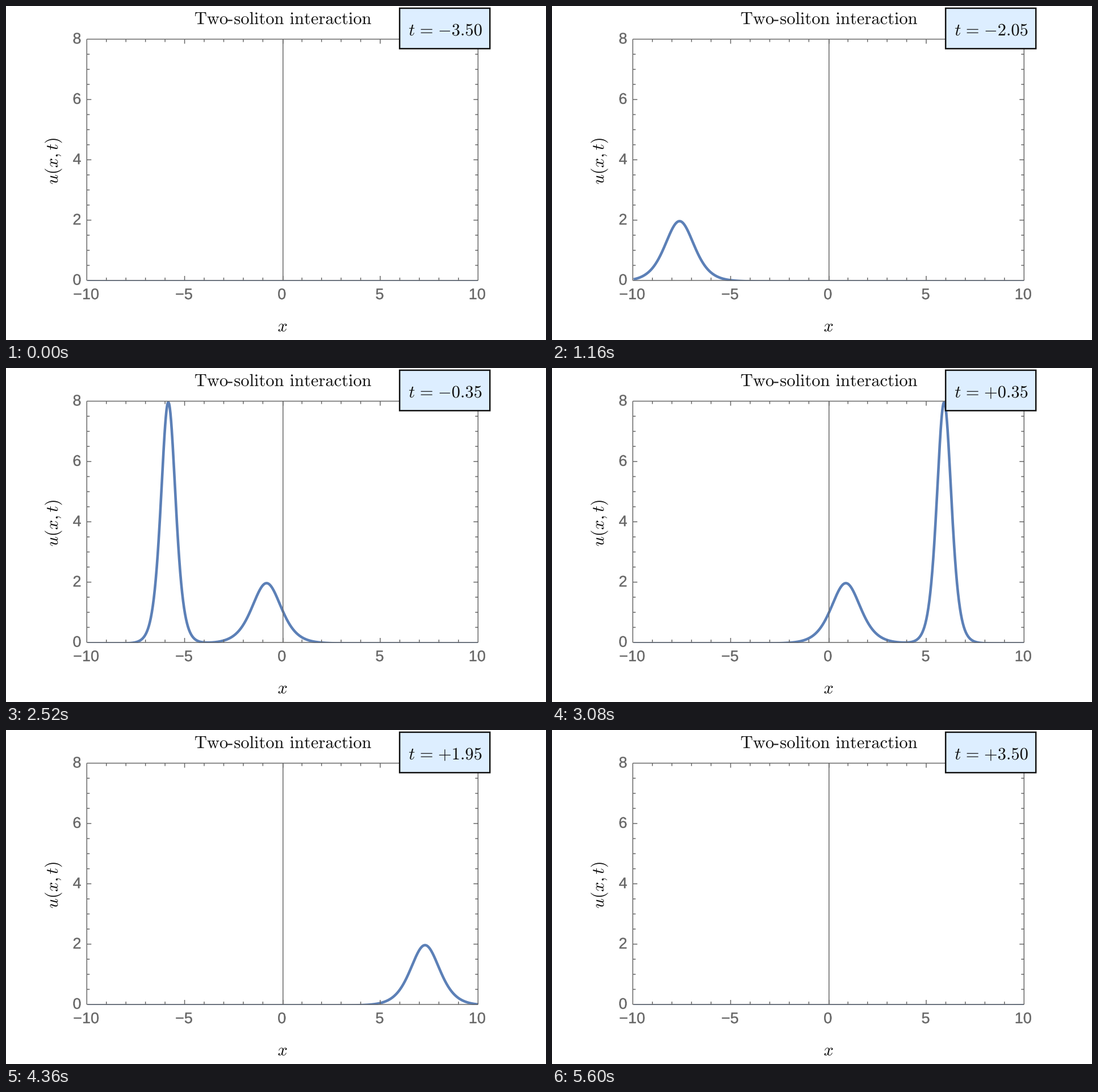
A matplotlib script for the animation above (5.64 s loop, 951 by 589 pixels).

```python
import numpy as np
import matplotlib.pyplot as plt
from matplotlib.animation import FuncAnimation
from matplotlib.collections import LineCollection
from matplotlib.patches import PathPatch, Rectangle
from matplotlib.textpath import TextPath
from matplotlib.transforms import Affine2D

W, H, DPI = 951, 589, 64
FRAMES, STEP_MS = 141, 40
EM = 30.5
INK, GRAY, BLUE = "#111111", "#666666", "#5c80b7"
LEFT, RIGHT, TOP, BOTTOM = 142.3, 831.3, 58.5, 484.0
SHIFT = 1.4, 1.8  # the curve sits slightly right of and below the frame's grid
SANS = {"family": "Liberation Sans"}

plt.rcParams["mathtext.fontset"] = "cm"


def px(w):
    return w * 72 / DPI


def sx(x):
    return LEFT + (x + 10) / 20 * (RIGHT - LEFT)


def sy(u):
    return BOTTOM - u / 8 * (BOTTOM - TOP)


fig = plt.figure(figsize=(W / DPI, H / DPI), dpi=DPI, facecolor="white")
ax = fig.add_axes([0, 0, 1, 1])
ax.set_xlim(0, W)
ax.set_ylim(H, 0)
ax.axis("off")


def glyphs(s, x, y, size=EM, align=0.5, turn=0, font=None):
    """Outline of a text, its ink aligned to x and its baseline at y."""
    path = TextPath((0, 0), s, size=size, prop=font)
    box = path.get_extents()
    shift = -(box.x0 + align * box.width)
    place = Affine2D().translate(shift, 0).scale(1, -1).rotate_deg(-turn)
    return place.translate(x, y).transform_path(path)


def write(s, x, y, **kw):
    return ax.add_patch(PathPatch(glyphs(s, x, y, **kw), fc=INK, lw=0,
                                  zorder=5, snap=False))


def tick_label(k, x, y):
    path = glyphs(str(k).replace("-", "\u2212"), x, y, size=27, font=SANS)
    ax.add_patch(PathPatch(path, fc=GRAY, ec=GRAY, lw=px(0.4), snap=False))


def soliton(x, t):
    top = 3 + 4 * np.cosh(2 * x - 8 * t) + np.cosh(4 * x - 64 * t)
    return 12 * top / (3 * np.cosh(x - 28 * t) + np.cosh(3 * x - 36 * t)) ** 2


def clock(t):
    sign = "-" if t < 0 else "+"
    s = rf"$t\hspace{{0.117}}=\hspace{{0.117}}{{{sign}}}{abs(t):.2f}$"
    return glyphs(s, 710, 52, align=0)


# Frame, ticks and the vertical axis
axis = sx(0) + SHIFT[0] - 0.4
lines = [[(LEFT, TOP), (RIGHT, TOP)], [(LEFT, BOTTOM), (RIGHT, BOTTOM)],
         [(LEFT, TOP), (LEFT, BOTTOM)], [(RIGHT, TOP), (RIGHT, BOTTOM)],
         [(axis, TOP), (axis, BOTTOM)]]
for k in range(-9, 10):
    n = 5 if k % 5 else 8
    x = sx(k) if k else axis
    lines += [[(x, TOP), (x, TOP + n)], [(x, BOTTOM), (x, BOTTOM - n)]]
for k in range(1, 16):
    n = 5 if k % 4 else 8
    y = sy(k / 2)
    lines += [[(LEFT, y), (LEFT + n, y)], [(RIGHT, y), (RIGHT - n, y)]]
frame = LineCollection(lines, colors=GRAY, linewidths=px(1.5), zorder=4)
frame.set_snap(False)
ax.add_collection(frame)

for k in range(-10, 11, 5):
    tick_label(k, sx(k) - 1, 517)
for k in range(0, 9, 2):
    tick_label(k, 125, sy(k) + 7.7)

# Title and axis labels
write(r"$\mathrm{Two}\hspace{0.379}\mathrm{soliton}\hspace{0.379}\mathrm{interaction}$",
      488, 32)
ax.add_patch(Rectangle((390.4, 24.4), 8.3, 2, fc=INK, lw=0, snap=False))
write("$x$", 487, 574)
write("$u(x,t)$", 91, 274, turn=90)

# Time box
ax.add_patch(Rectangle((693.2, 3.9), 159, 71.3, fc="#ddeeff", ec=INK,
                       lw=px(2.5), zorder=6, snap=False))
counter = ax.add_patch(PathPatch(clock(-3.5), fc=INK, lw=0, zorder=7, snap=False))

xs = np.linspace(-10, 10, 1201)
curve, = ax.plot([], [], color=BLUE, lw=px(4.6), solid_joinstyle="round",
                 solid_capstyle="butt", zorder=3)
curve.set_clip_path(Rectangle((LEFT, 58), RIGHT - LEFT, 427, transform=ax.transData))


def update(i):
    t = (i - 70) / 20
    curve.set_data(sx(xs) + SHIFT[0], sy(soliton(xs, t)) + SHIFT[1])
    counter.set_path(clock(t))
    return curve, counter


anim = FuncAnimation(fig, update, frames=FRAMES, interval=STEP_MS, repeat=True)
plt.show()
```
